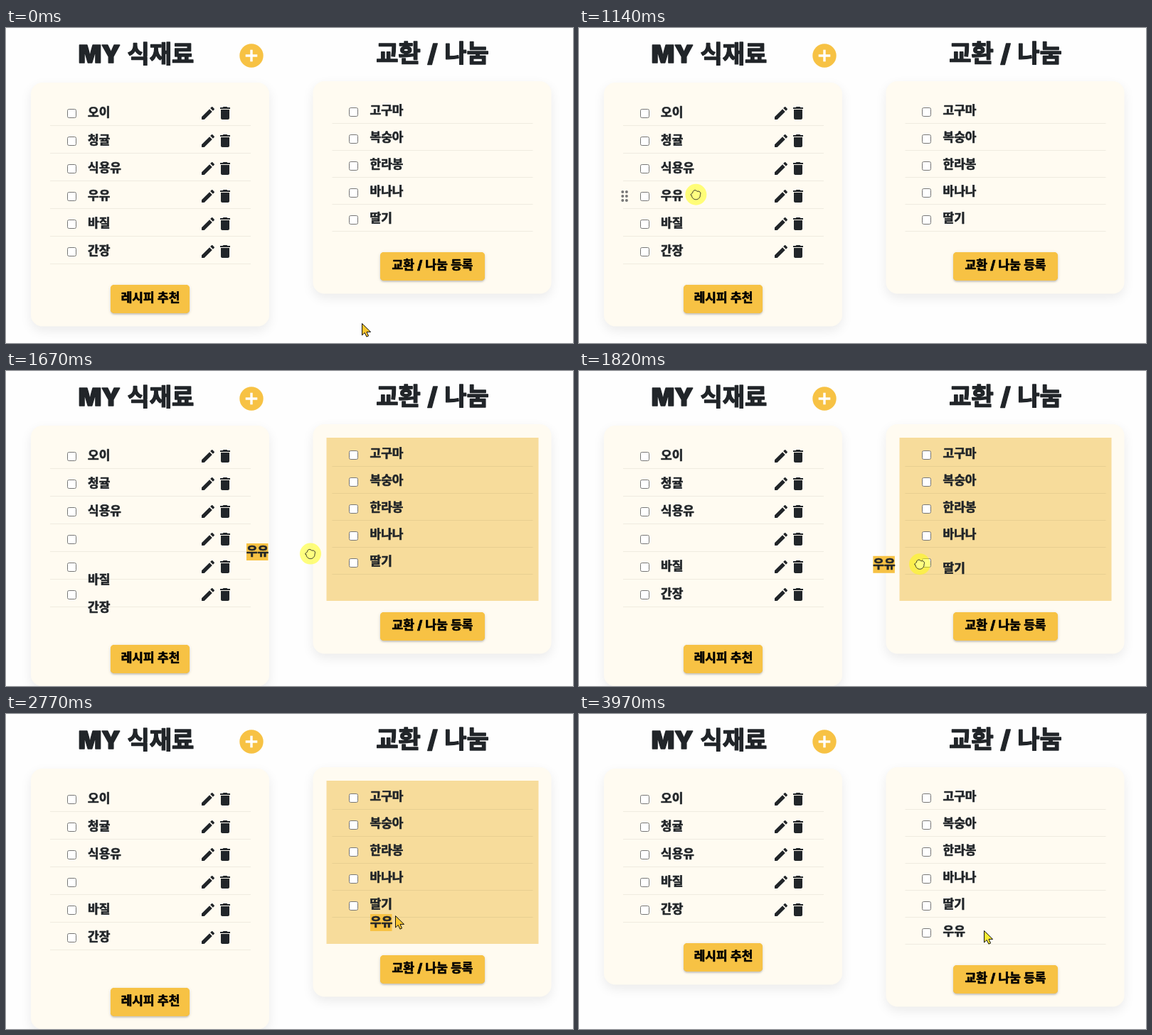
Animation, 797 px wide and 444 px high, one loop 4040 ms. Source, as an HTML page with a canvas:

```html
<!DOCTYPE html>
<html lang="ko">
<head>
<meta charset="utf-8">
<style>
html, body { margin: 0; width: 100%; height: 100%; overflow: hidden; background: #fefefe; }
canvas { display: block; }
</style>
</head>
<body>
<canvas id="stage" width="797" height="444"></canvas>
<script>
const c = document.getElementById('stage').getContext('2d');
const LOOP = 4040, GOLD = '#f7c244', INK = '#212529';
const FONT = 'Inter, "Noto Sans CJK KR", "Noto Sans CJK", sans-serif';

const PENCIL = new Path2D('M3 17.25V21h3.75L17.81 9.94l-3.75-3.75zM20.71 7.04a1 1 0 0 0 0-1.41l-2.34-2.34a1 1 0 0 0-1.41 0l-1.83 1.83 3.75 3.75z');
const TRASH = new Path2D('M6 19c0 1.1.9 2 2 2h8c1.1 0 2-.9 2-2V7H6zM19 4h-3.5l-1-1h-5l-1 1H5v2h14z');
const ARROW = new Path2D('M.5 .5V17L4.2 13.5L6.9 19.2L9.6 18L7 12.4H12.6Z');

// A closed palm: scalloped knuckles above, smooth below.
const HAND = new Path2D();
for (let a = 0; a < 2 * Math.PI; a += .1) {
  const r = a > Math.PI ? 5.6 + 1.7 * Math.abs(Math.sin(2.5 * a)) : 6;
  HAND.lineTo(r * Math.cos(a), r * Math.sin(a));
}
HAND.closePath();

const clamp = p => Math.min(1, Math.max(0, p));
const progress = (t, from, to) => clamp((t - from) / (to - from));
const easeInOut = p => p < .5 ? 2 * p * p : 1 - 2 * (1 - p) ** 2;
const easeOut = p => 1 - (1 - p) ** 2;

// Each move: start, end, target x, target y.
const CURSOR = { x: 500, y: 416, moves: [[3, 540, 129, 233], [1004, 1530, 411, 237], [1530, 2090, 547, 284], [3969, 3970, 569, 305]] };
const DRAG = { x: 115, y: 237, moves: [[1136, 1530, 321, 237], [1565, 2090, 533, 287], [2500, 2774, 512, 294]] };

function follow({ x, y, moves }, t) {
  for (const [from, to, toX, toY] of moves) {
    const p = progress(t, from, to);
    x += (toX - x) * easeInOut(p);
    y += (toY - y) * easeOut(p);
  }
  return [x, y];
}

// The picture advances in eight steps per burst of movement.
const BURSTS = [[70, 540], [1070, 1530], [1600, 2090], [2500, 2980]];
function snap(t) {
  for (const [a, b] of BURSTS) {
    const step = (b - a) / 7;
    if (t >= a - step && t < b + step) return a + Math.floor((t - a) / step + .1) * step;
  }
  return t;
}

function text(s, x, y, { size = 17, align = 'left', color = INK, gap = 0 } = {}) {
  c.font = `900 ${size}px ${FONT}`;
  c.textAlign = align;
  c.wordSpacing = gap + 'px';
  c.fillStyle = c.strokeStyle = color;
  c.lineWidth = size * .04;
  c.lineJoin = 'round';
  c.fillText(s, x, y + size * .37);
  c.strokeText(s, x, y + size * .37);
}

function rect(x, y, w, h, fill) {
  c.fillStyle = fill;
  c.fillRect(x, y, w, h);
}

function round(x, y, w, h, r, fill) {
  c.beginPath();
  c.roundRect(x, y, w, h, r);
  c.fillStyle = fill;
  c.fill();
}

function disc(x, y, r, fill) {
  c.beginPath();
  c.arc(x, y, r, 0, 7);
  c.fillStyle = fill;
  c.fill();
}

function shadowed(dy, blur, alpha, draw) {
  c.save();
  c.shadowColor = `rgba(0,0,0,${alpha})`;
  c.shadowOffsetY = dy;
  c.shadowBlur = blur;
  draw();
  c.restore();
}

function shape(path, x, y, fill, stroke) {
  c.save();
  c.translate(x, y);
  c.fillStyle = fill;
  c.fill(path);
  if (stroke) {
    c.strokeStyle = stroke;
    c.lineWidth = 1;
    c.stroke(path);
  }
  c.restore();
}

function list({ x, y, pitch, names, extra, glow, button, width, icons, shift }) {
  const first = y + pitch + 21;
  const end = first + (names.length - 1) * pitch;
  const top = end + 30 + extra;
  shadowed(6, 16, .08, () => round(x, y, 335, top + 58.5 - y, 16, '#fffbf1'));
  if (glow) {
    c.globalAlpha = glow;
    rect(x + 19, y + 19, 298, end - y - 5 + extra, '#f7dc9b');
    c.globalAlpha = 1;
  }
  names.forEach((name, i) => {
    const line = first + i * pitch;
    rect(x + 27, line, 282, 1, 'rgba(60,50,30,.08)');
    round(Math.floor(x + 51) + .5, line - pitch + 16.5, 12, 12, 2, '#fff');
    c.strokeStyle = '#767676';
    c.lineWidth = 1;
    c.stroke();
    text(name, x + 80, line - 18 + shift(i));
    if (icons) {
      shape(PENCIL, x + 237, line - 29, INK);
      shape(TRASH, x + 261, line - 29, INK);
    }
  });
  const left = Math.round(x + 167.5 - width / 2);
  for (const [dy, blur, alpha] of [[1, 5, .12], [2, 2, .14]])
    shadowed(dy, blur, alpha, () => round(left, top, width, 40, 5, GOLD));
  text(button, x + 168, top + 18, { align: 'center', color: '#000', gap: 1 });
}

function draw(t) {
  const dropped = t >= 2840;
  const lifted = t >= 1195 && !dropped, entered = t >= 1665 && !dropped;
  const hovered = t >= 465 && t < 2500, pressed = t >= 870 && t < 2500;

  rect(0, 0, 797, 444, '#fefefe');
  const title = { size: 34, align: 'center', gap: 3 };
  text('MY 식재료', 183, 36, title);
  text('교환 / 나눔', 599.5, 35, title);
  disc(345, 39, 16.7, GOLD);
  rect(336.7, 37.3, 16.6, 3.4, '#fff');
  rect(343.3, 30.7, 3.4, 16.6, '#fff');

  const mine = ['오이', '청귤', '식용유', '우유', '바질', '간장'];
  const shared = ['고구마', '복숭아', '한라봉', '바나나', '딸기'];
  if (lifted) mine[3] = '';
  if (dropped) shared.push(...mine.splice(3, 1));

  const gapLeft = lifted ? 24 * (1 - easeInOut(progress(t, 1600, 1810))) : 0;
  const gapRight = 10 * Math.sin(Math.PI * Math.sqrt(progress(t, 1670, 2230)));
  list({
    x: 35, y: 77, pitch: 39, names: mine, extra: lifted ? 24 : 0,
    glow: lifted && !entered ? 1 : 0, button: '레시피 추천', width: 111, icons: true,
    shift: i => i > 3 ? gapLeft : 0
  });
  list({
    x: 431.5, y: 75, pitch: 38, names: shared, extra: entered ? 24 : 0,
    glow: entered ? 1 : dropped ? 1 - progress(t, 2780, 2970) : 0,
    button: '교환 / 나눔 등록', width: 147, icons: false,
    shift: i => i === 4 ? gapRight : 0
  });

  if (hovered && !lifted)
    for (let i = 0; i < 6; i++) disc(61.3 + i % 2 * 5.6, 231 + (i >> 1) * 6, 2, '#777');

  if (lifted) {
    const [x, y] = follow(DRAG, t);
    rect(x, y - 12, 30.5, 24, GOLD);
    text('우유', x, y - 1);
  }

  const [x, y] = follow(CURSOR, t);
  if (pressed) disc(x, y, 15, 'rgba(255,255,0,.5)');
  if (hovered) shape(HAND, x, y + 1, pressed ? '#ffff80' : '#fff', '#222');
  else shape(ARROW, x, y, t >= 3970 ? '#fbee35' : '#fbc62f', '#111');
}

const start = performance.now();
function tick() {
  draw(snap((performance.now() - start) % LOOP));
  requestAnimationFrame(tick);
}
tick();
</script>
</body>
</html>
```
